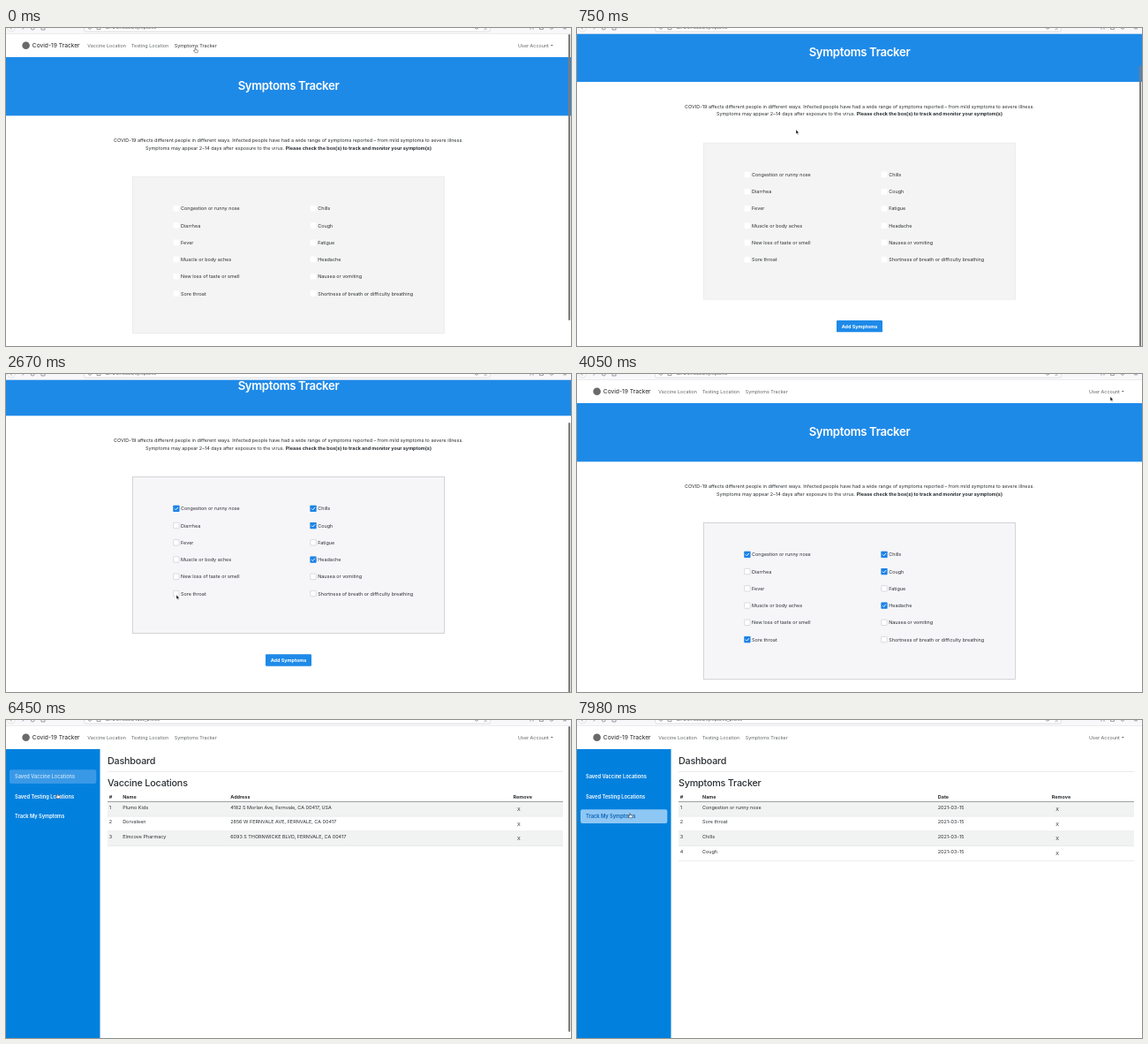
An HTML page for the animation above (8000 ms loop, 640x360 px).

```html
<!DOCTYPE html>
<html lang="en">
<head>
<meta charset="utf-8">
<title>Symptoms Tracker</title>
<style>
html, body { margin: 0; width: 100%; height: 100%; overflow: hidden; background: #fff; }
svg { display: block; width: 640px; height: 360px; }
text { font-family: Inter, "Open Sans", sans-serif; white-space: pre; }
</style>
</head>
<body>
<svg id="stage" viewBox="0 0 640 360" xmlns="http://www.w3.org/2000/svg"></svg>
<script>
const NS = 'http://www.w3.org/2000/svg';
const LOOP = 8000, BODY = 5.46, INK = '#2b2f33';
const stage = document.getElementById('stage');

function add(parent, tag, attrs) {
  const el = document.createElementNS(NS, tag);
  for (const k in attrs) el.setAttribute(k, attrs[k]);
  parent.appendChild(el);
  return el;
}
const group = parent => add(parent, 'g', {});
const rect = (p, x, y, width, height, fill, more) =>
  add(p, 'rect', { x, y, width, height, fill, ...more });
const rule = (p, x, y, w, fill, h = 0.6) => rect(p, x, y - h / 2, w, h, fill);

// y is the middle of the capital letters
function label(p, str, x, y, o = {}) {
  const { size = BODY, fill = INK, weight = 400, anchor = 'start', track = 0 } = o;
  const el = add(p, 'text', {
    x, y: y + size * 0.36, fill, 'font-size': size, 'font-weight': weight,
    'text-anchor': anchor, 'letter-spacing': track + 'em'
  });
  el.textContent = str;
  return el;
}
const show = (el, on) => el.setAttribute('visibility', on ? 'inherit' : 'hidden');
const move = (el, x, y) => el.setAttribute('transform', `translate(${x} ${y})`);
const clamp = v => Math.max(0, Math.min(1, v));
const ease = u => u * u * (3 - 2 * u);
const ramp = (t, a, b) => ease(clamp((t - a) / (b - a)));

rect(stage, 0, 0, 640, 360, '#fff');

// Symptoms page
const page = group(stage);
const pageNav = group(page);
rect(page, 0, 33, 640, 66.3, '#1e8ae8');
label(page, 'Symptoms Tracker', 320, 65.3,
  { size: 13.2, fill: '#fff', weight: 600, anchor: 'middle', track: -0.025 });
label(page, 'COVID-19 affects different people in different ways. Infected people have had a wide range of symptoms reported – from mild symptoms to severe illness.',
  320, 127.2, { anchor: 'middle' });
const advice = label(page, 'Symptoms may appear 2–14 days after exposure to the virus. ', 320, 135.7, { anchor: 'middle' });
add(advice, 'tspan', { 'font-weight': 700 }).textContent =
  'Please check the box(s) to track and monitor your symptom(s)';

const panel = rect(page, 143.5, 168.5, 353, 177, '#f4f4f4', { 'stroke-width': 0.8 });
const columns = [
  [189.3, ['Congestion or runny nose', 'Diarrhea', 'Fever', 'Muscle or body aches', 'New loss of taste or smell', 'Sore throat']],
  [344.4, ['Chills', 'Cough', 'Fatigue', 'Headache', 'Nausea or vomiting', 'Shortness of breath or difficulty breathing']]
];
const checkTimes = {
  'Congestion or runny nose': 1260, 'Chills': 1710, 'Cough': 1920, 'Headache': 2190, 'Sore throat': 2820
};
const boxes = [], ticks = [];
for (const [x, names] of columns) {
  names.forEach((name, i) => {
    const y = 204.3 + i * 19.25;
    boxes.push(rect(page, x + 0.4, y - 3.2, 6.4, 6.4, '#fff', { 'stroke-width': 0.7, rx: 0.5 }));
    label(page, name, x + 8.8, y);
    if (checkTimes[name]) {
      const tick = group(page);
      rect(tick, x, y - 3.6, 7.2, 7.2, '#1b83e8', { rx: 0.6 });
      add(tick, 'path', {
        d: `M${x + 1.7} ${y + 0.1}l1.4 1.4l2.5-2.9`, fill: 'none', stroke: '#fff', 'stroke-width': 0.9
      });
      ticks.push([tick, checkTimes[name]]);
    }
  });
}
rect(page, 294, 369.3, 52, 13.4, '#1e8ae8', { rx: 1.2 });
label(page, 'Add Symptoms', 320, 376.1, { fill: '#fff', weight: 700, anchor: 'middle' });

// Dashboard
const dash = group(stage);
const dashNav = group(dash);
rect(dash, 0, 33, 106.5, 327, '#0280de');
const heading = { size: 10.75, weight: 500, track: -0.018 };
label(dash, 'Dashboard', 115, 46, heading);
rule(dash, 115, 58.6, 516, '#dedede');

function table(title, cols, rows) {
  const g = group(dash), step = 16.7, top = 92.4;
  label(g, title, 115, 71.6, heading);
  cols.forEach(([name, x]) => label(g, name, x, 86.8, { weight: 700 }));
  rows.forEach((row, i) => {
    const y = top + i * step;
    if (i % 2 === 0) rect(g, 115, y, 516, step, '#f1f2f2');
    rule(g, 115, y + step, 516, '#dee2e6');
    [i + 1, ...row].forEach((cell, c) => label(g, cell, cols[c][1], y + 6.2));
    label(g, 'X', cols[cols.length - 1][1] + 6.2, y + 8.5, { anchor: 'middle' });
  });
  rule(g, 115, top, 516, '#8a8d90', 0.8);
  return g;
}
const places = table('Vaccine Locations',
  [['#', 116.8], ['Name', 132.2], ['Address', 254.2], ['Remove', 574.6]],
  [
    ['Plumo Kids', '4182 S Morlan Ave, Fernvale, CA 00417, USA'],
    ['Dorvaleen', '2856 W FERNVALE AVE, FERNVALE, CA 00417'],
    ['Elmcove Pharmacy', '6093 S THORNWICKE BLVD, FERNVALE, CA 00417']
  ]);
const tracked = table('Symptoms Tracker',
  [['#', 116.8], ['Name', 142], ['Date', 408.8], ['Remove', 537.8]],
  ['Congestion or runny nose', 'Sore throat', 'Chills', 'Cough'].map(s => [s, '2021-03-15']));

// Each link is focused from one click to the next
const links = [
  ['Saved Vaccine Locations', 64.2, 5970, 6720],
  ['Saved Testing Locations', 86.7, 6720, 7260],
  ['Track My Symptoms', 109.2, 7260, LOOP]
].map(([name, y, from, to]) => ({
  y, from, to,
  pill: rect(dash, 4, y - 8, 98.3, 15.8, '#fff', { rx: 2 }),
  text: label(dash, name, 10, y, { size: 5.7, weight: 600, fill: '#fff' })
}));

// Navigation bar, once per page
function navBar(g) {
  rect(g, 0, 7, 640, 26, '#fff');
  add(g, 'circle', { cx: 22.6, cy: 19.8, r: 4.3, fill: '#6a6a6a' });
  label(g, 'Covid-19 Tracker', 29.8, 19.9, { size: 6.67, fill: '#222' });
  const grey = { fill: '#62666a', size: 5.42 };
  label(g, 'Vaccine Location', 92.2, 20, grey);
  label(g, 'Testing Location', 142, 20, grey);
  const last = label(g, 'Symptoms Tracker', 190.7, 20, grey);
  label(g, 'User Account', 580, 20, grey);
  add(g, 'path', { d: 'M616.8 19h3l-1.5 1.6z', fill: '#62666a' });
  return last;
}
const activeLink = navBar(pageNav);
navBar(dashNav);

// Bottom edge of the browser toolbar
rect(stage, 0, 0, 640, 6.6, '#f8f8fa');
rule(stage, 0, 6.5, 640, '#dcdce0', 0.5);
rect(stage, 88.5, -12, 460, 16, '#fff', { rx: 2, stroke: '#c9c9ce', 'stroke-width': 0.6 });
const address = label(stage, '', 112, -1, { size: 4.9, fill: '#555' });
const icon = d => add(stage, 'path', { d, fill: 'none', stroke: '#77777b', 'stroke-width': 0.7 });
add(stage, 'circle', { cx: 6, cy: -0.5, r: 4.4, fill: '#fff', stroke: '#c4c4c8', 'stroke-width': 0.5 });
icon('M5 0l1.6 1.6M18.6 1.6l1.6-1.6M28.2 0a2 2 0 0 0 4 0M40 0v2h4v-2M93 0q2 3 4 0M103 0v1.6h4v-1.6');
icon('M531 0q2 2.6 4 0M541.5 1.8l1.6-1.2l1.6 1.2M594 0v1.6M597 0v1.6M604.5 0v1.4h4v-1.4M616 0q2 2.8 4 0M631 0.8h4');

const thumb = rect(stage, 637, 7, 2.2, 324, '#7c7c7e', { rx: 1.1 });

const arrow = add(stage, 'path', {
  d: 'M0 0v5l1.15-1.05l.85 1.75l.8-.4l-.8-1.65h1.55z',
  fill: '#111', stroke: '#fff', 'stroke-width': 0.45
});
const hand = add(stage, 'path', {
  d: 'M-.5 .3q.5-.7 1 0v1.7l2 .5q.5.2.4.8l-.4 2h-2.9l-1.7-2.2q.2-.7.9-.3l.7.5z',
  fill: '#fff', stroke: '#333', 'stroke-width': 0.5
});

const path = [
  [60, 214.5, 22.5], [500, 248, 115], [870, 248, 115], [1200, 192, 151], [1350, 192, 151],
  [1680, 347, 151], [1740, 347, 151], [1890, 347, 170], [1980, 347, 170], [2160, 347, 209],
  [2250, 347, 209], [2640, 193, 250], [3300, 193, 250], [3500, 318, 323], [3570, 318, 323],
  [3750, 604, 25.5], [4080, 604, 25.5], [4350, 585.5, 44.5], [5220, 585.5, 44.5],
  [5880, 60, 62], [6150, 60, 62], [6450, 58.5, 83.5], [6750, 58.5, 83.5], [7080, 60, 105.5]
];
const SWEEP = 5220;

function pointer(t) {
  const next = path.findIndex(k => k[0] > t);
  if (next < 1) return (next ? path[path.length - 1] : path[0]).slice(1);
  const [a, x0, y0] = path[next - 1], [b, x1, y1] = path[next];
  const u = ramp(t, a, b);
  const dip = a === SWEEP ? 175 * Math.sin(Math.PI * u) : 0;
  return [x0 + (x1 - x0) * u, y0 + (y1 - y0) * u + dip];
}

// Overlay scroll bar: visible spans, each fading at its end
const spans = [[0, 3750], [4500, 5040], [6030, 6540], [6720, 7200], [7260, 7740]];
const barOpacity = t => {
  const s = spans.find(([a, b]) => t >= a && t < b);
  return s ? clamp((s[1] - t) / 80) : 0;
};

function draw(t) {
  const onDash = t >= 4500, onTracked = t >= 7260, sharp = t >= 1680;
  const scroll = t < 4050 ? 52 * ramp(t, 575, 840) : 0;
  const [x, y] = pointer(t);

  show(page, !onDash);
  show(dash, onDash);
  move(page, 0, -scroll);
  activeLink.setAttribute('fill', t < 150 ? '#333' : '#62666a');
  panel.setAttribute('fill', sharp ? '#f6f6f9' : '#f4f4f4');
  panel.setAttribute('stroke', sharp ? '#cbcbcf' : '#e9e9e9');
  boxes.forEach(b => b.setAttribute('stroke', sharp ? '#cdcdd2' : '#fafafa'));
  ticks.forEach(([el, at]) => show(el, t >= at));

  show(places, onDash && !onTracked);
  show(tracked, onTracked);
  for (const l of links) {
    const on = onDash && t >= l.from && t < l.to;
    const over = Math.abs(y - l.y) < 8;
    show(l.pill, on);
    l.pill.setAttribute('fill', over ? '#8ec7f4' : '#3a99e6');
    l.text.setAttribute('fill', !on ? '#fff' : over ? '#0b62b4' : '#d3e8fa');
    l.text.setAttribute('font-weight', on && !over ? 500 : 600);
  }

  address.textContent = '127.0.0.1:3000/' +
    (onTracked ? 'symptoms_profile' : onDash ? 'vacc_profile' : 'symptoms');
  thumb.setAttribute('y', 7 + scroll * 0.925);
  thumb.setAttribute('height', onDash ? 346 : 324);
  thumb.setAttribute('opacity', barOpacity(t));

  const pointing = t < 150 || (t > 3480 && t < 3600) || t > 5850;
  show(hand, pointing);
  show(arrow, !pointing);
  move(pointing ? hand : arrow, x, y);
}

function tick() {
  draw(performance.now() % LOOP);
  requestAnimationFrame(tick);
}
tick();
</script>
</body>
</html>
```
